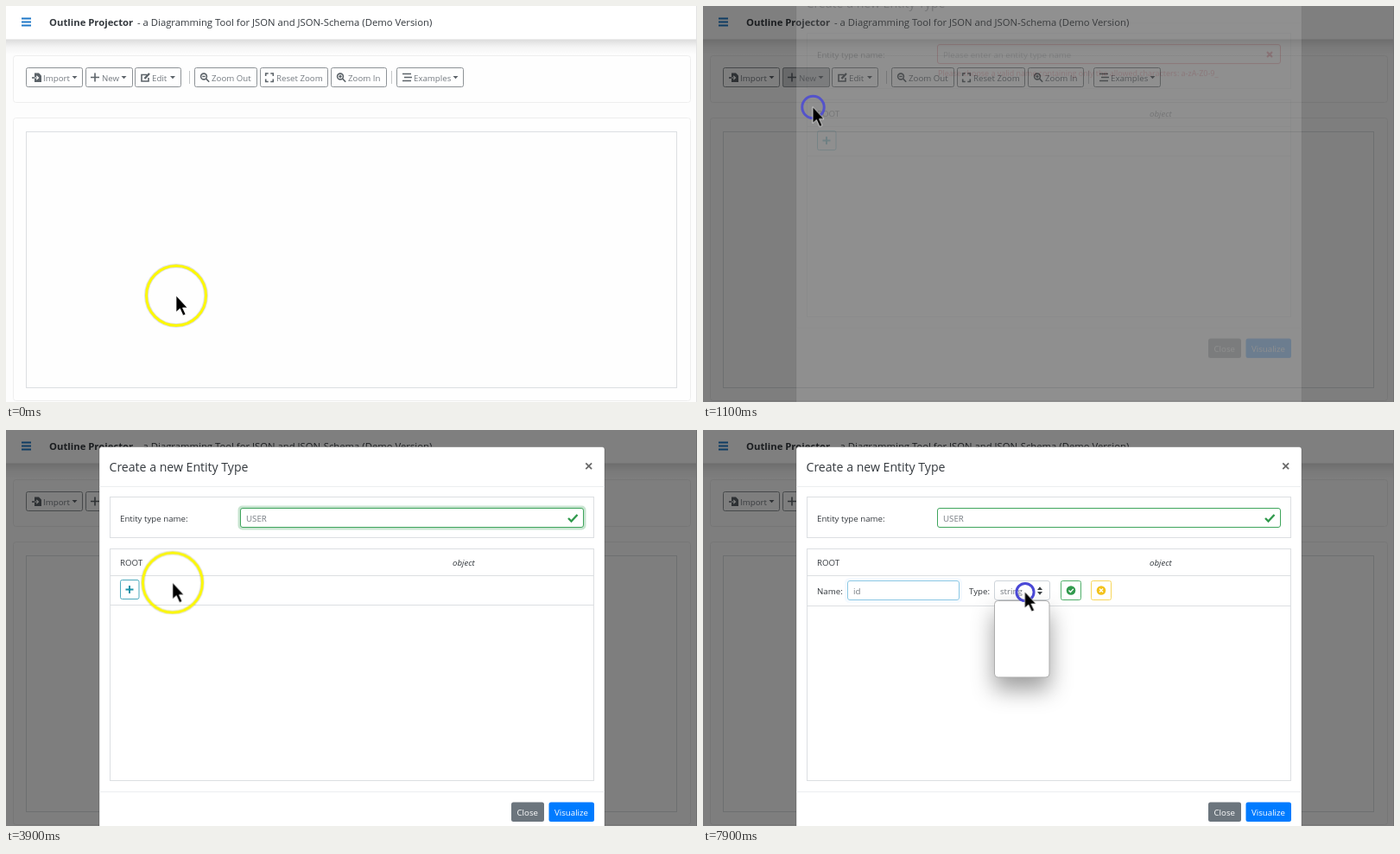
Write an HTML page that moves like this. It is 800x458 px and loops after 8000 ms.

```html
<!DOCTYPE html>
<html lang="en">
<head>
<meta charset="utf-8">
<title>Entity editor demo</title>
<style>
html, body { margin: 0; width: 100%; height: 100%; overflow: hidden; background: #fdfdfd; }
svg { display: block; width: 800px; height: 458px; }
text { font: 9.7px "Open Sans", "Noto Sans", sans-serif; fill: #34393e; white-space: pre; }
.bar text { fill: #747a80; }
.box { fill: none; stroke: #dcdfe2; }
.btn { fill: #fefefe; stroke: #8d9296; }
.ico { fill: none; stroke: #5c6369; stroke-width: 1.6; }
.solid { fill: #5c6369; }
.field { fill: #fff; stroke: #ced4da; }
.grey { fill: #747a80; }
.white { fill: #fff; }

/* One loop is 8 s, so 1% = 80 ms. */
.step, .move { animation: 8s infinite; }
.step { animation-timing-function: step-end; }
.move { animation-timing-function: ease-in-out; }

/* toolbar menu */
#active { animation-name: active; }
@keyframes active { 0% { opacity: 0 } 6% { opacity: 1 } 15%, to { opacity: 0 } }
#menu { animation-name: menu; }
@keyframes menu { 0% { opacity: 0 } 6.5% { opacity: 1 } 12%, to { opacity: 0 } }

/* dialog */
#shade { animation-name: shade; animation-timing-function: linear; }
@keyframes shade { 0%, 11.25% { opacity: 0 } 12.5% { opacity: .35 } 13.4%, to { opacity: .5 } }
#dialog { animation-name: slide, appear; animation-timing-function: linear; }
@keyframes slide {
  0%, 13.5% { transform: translateY(-50px) }
  16.25% { transform: translateY(-7px) }
  17.5%, to { transform: none }
}
@keyframes appear { 0%, 13.5% { opacity: 0 } 15.4%, to { opacity: 1 } }

/* entity name validation */
.bad { animation-name: bad; }
@keyframes bad { 0% { opacity: 1 } 29.75%, to { opacity: 0 } }
.good { animation-name: good; }
@keyframes good { 0% { opacity: 0 } 29.75%, to { opacity: 1 } }
.edge { animation-name: edge; }
@keyframes edge { 0% { stroke: #dc4a59 } 29.75%, to { stroke: #3fa55c } }
#glow { animation-name: edge, glow; }
@keyframes glow { 0% { opacity: 0 } 24.75% { opacity: .28 } 63.5%, to { opacity: 0 } }
#caret { animation-name: caret; }
@keyframes caret { 0% { opacity: 0 } 24.75% { opacity: 1 } 29.75%, to { opacity: 0 } }
#form { animation-name: form; }
@keyframes form { 0% { height: 64px } 29.75%, to { height: 47px } }
#panel { animation-name: panel; }
@keyframes panel { 0% { y: 154.5px; height: 251px } 29.75%, to { y: 137.5px; height: 268px } }
#head { animation-name: head; }
@keyframes head { 0% { transform: translateY(17px) } 29.75%, to { transform: none } }
#line { animation-name: line; }
@keyframes line { 0% { transform: none } 63.5%, to { transform: translateY(1px) } }

/* typed letters */
.l1 { animation-name: l1; }
@keyframes l1 { 0% { fill-opacity: 0 } 35%, to { fill-opacity: 1 } }
.l2 { animation-name: l2; }
@keyframes l2 { 0% { fill-opacity: 0 } 37.25%, to { fill-opacity: 1 } }
.l3 { animation-name: l3; }
@keyframes l3 { 0% { fill-opacity: 0 } 38.5%, to { fill-opacity: 1 } }
.l4 { animation-name: l4; }
@keyframes l4 { 0% { fill-opacity: 0 } 78.5%, to { fill-opacity: 1 } }
.l5 { animation-name: l5; }
@keyframes l5 { 0% { fill-opacity: 0 } 83.5%, to { fill-opacity: 1 } }

/* property row */
#plus { animation-name: plus; }
@keyframes plus { 0% { opacity: 1 } 63.5%, to { opacity: 0 } }
#row { animation-name: row; animation-timing-function: linear; }
@keyframes row { 0%, 64.5% { opacity: 0 } 65% { opacity: .04 } 69%, to { opacity: 1 } }
#halo { animation-name: halo; }
@keyframes halo { 0% { opacity: 0 } 69% { opacity: .25 } 97.8%, to { opacity: .05 } }
#ok { animation-name: ok; }
@keyframes ok { 0% { opacity: .6 } 83.5%, to { opacity: 1 } }
#list { animation-name: list; }
@keyframes list { 0% { opacity: 0 } 98.1%, to { opacity: 1 } }
#list rect { filter: drop-shadow(0 14px 13px rgba(0, 0, 0, .38)); }

/* pointer */
#pointer { animation-name: path; }
@keyframes path {
  0%, 1% { transform: translate(197px, 335px) }
  5%, 8% { transform: translate(119px, 85px) }
  10.5%, 13.75% { transform: translate(127px, 116.5px); animation-timing-function: ease-in }
  16.25% { transform: translate(173px, 147px); animation-timing-function: ease-out }
  22%, 43% { transform: translate(311px, 104px); animation-timing-function: step-end }
  44.5% { transform: translate(278px, 124px); animation-timing-function: ease-in }
  48.75% { transform: translate(193px, 176.5px); animation-timing-function: ease-out }
  54%, 68.75% { transform: translate(147px, 177px) }
  76%, 90% { transform: translate(197px, 180px) }
  94% { transform: translate(430px, 189px) }
  97%, to { transform: translate(372.5px, 187px) }
}
#shown { animation-name: shown; }
@keyframes shown {
  0% { opacity: 1 } 29.75% { opacity: 0 } 44.75% { opacity: 1 }
  78.5% { opacity: 0 } 89.75%, to { opacity: 1 }
}
#arrow { animation-name: arrow; }
@keyframes arrow { 0% { opacity: 1 } 21% { opacity: 0 } 44%, to { opacity: 1 } }
#beam { animation-name: beam; }
@keyframes beam { 0% { opacity: 0 } 21% { opacity: 1 } 44%, to { opacity: 0 } }
#ring { animation-name: ring; }
@keyframes ring {
  0% { opacity: 1 } 5.8% { opacity: 0 } 44.75% { opacity: 1 }
  63.4% { opacity: 0 } 89.75% { opacity: 1 } 97.8%, to { opacity: 0 }
}
.click {
  fill: none; stroke: #4a48d6; stroke-width: 3;
  animation: click 8s linear infinite;
  animation-delay: calc(var(--at) * 1ms - 8s);
}
@keyframes click {
  0% { r: 8px; opacity: 1 }
  1.4% { r: 11.8px; opacity: 1 }
  5% { r: 14.5px; opacity: .55 }
  6%, to { r: 15px; opacity: 0 }
}
</style>
</head>
<body>
<svg viewBox="0 0 800 458">
  <defs>
    <linearGradient id="fall" x2="0" y2="1">
      <stop stop-color="#000" stop-opacity=".14"/>
      <stop offset=".5" stop-color="#000" stop-opacity=".04"/>
      <stop offset="1" stop-color="#000" stop-opacity="0"/>
    </linearGradient>
    <path id="drop" class="solid" d="M0 0h6l-3 3.2z"/>
    <g id="lens" class="ico"><circle cx="4" cy="4" r="3.4"/><path d="M6.6 6.6l3.6 3.6M2.3 4h3.4"/></g>
  </defs>

  <!-- page -->
  <rect width="800" height="458" fill="#fdfdfd"/>
  <rect y="38" width="800" height="18" fill="url(#fall)"/>
  <rect width="800" height="38.5" fill="#fff"/>
  <path d="M799.5 0V458" stroke="#e3e3e3"/>
  <path d="M18 14.5h11M18 18.5h11M18 22.5h11" stroke="#1f78c8" stroke-width="2"/>
  <text x="50" y="23" style="font-size:11.3px;font-weight:700">Outline Projector</text>
  <text x="152" y="23" style="font-size:11.3px">- a Diagramming Tool for JSON and JSON-Schema (Demo Version)</text>
  <g fill="#fefefe" stroke="#eee">
    <rect x="8.5" y="57.5" width="784" height="54" rx="3"/>
    <rect x="8.5" y="129.5" width="784" height="327" rx="3"/>
  </g>
  <rect class="box" x="23.5" y="145.5" width="753" height="296"/>

  <!-- toolbar -->
  <g class="bar">
    <g class="btn">
      <rect x="23.5" y="71.5" width="65" height="22" rx="2"/>
      <rect x="92.5" y="71.5" width="54" height="22" rx="2"/>
      <rect x="149.5" y="71.5" width="53" height="22" rx="2"/>
      <rect x="218.5" y="71.5" width="72" height="22" rx="2"/>
      <rect x="294.5" y="71.5" width="78" height="22" rx="2"/>
      <rect x="376.5" y="71.5" width="64" height="22" rx="2"/>
      <rect x="452.5" y="71.5" width="77" height="22" rx="2"/>
    </g>
    <rect id="active" class="step" x="92.5" y="71.5" width="54" height="22" rx="2" fill="#cfd1d3" stroke="#8d9296"/>
    <path d="M212.5 75v15M446.5 75v15" stroke="#c4c6c8"/>
    <path class="solid" d="M33 77.5h5l3 3v7.5h-8z"/>
    <path d="M30 83h3" class="ico"/>
    <path d="M33 83h4.500M35.300 80.800l2.200 2.200-2.200 2.200" fill="none" stroke="#fff" stroke-width="1.200"/>
    <path class="ico" d="M98 82.500h10M103 77.500v10M163 79.500h-6v7.500h8v-4"/>
    <path d="M160.500 84l5.500-6" stroke="#5c6369" stroke-width="2.400"/>
    <use href="#lens" x="225" y="77.500"/>
    <path class="ico" d="M300.700 81v-3h3M306.300 78h3v3M309.300 84.500v3h-3M303.700 87.500h-3v-3"/>
    <use href="#lens" x="383" y="77.500"/>
    <path class="ico" d="M387 79.800v3.400M459 78.500h10M461 82.500h9M459 86.500h10"/>
    <use href="#drop" x="76.500" y="81"/>
    <use href="#drop" x="133.500" y="81"/>
    <use href="#drop" x="190" y="81"/>
    <use href="#drop" x="517.500" y="81"/>
    <text x="43" y="86.500">Import</text>
    <text x="111" y="86.500">New</text>
    <text x="169" y="86.500">Edit</text>
    <text x="238" y="86.500">Zoom Out</text>
    <text x="313" y="86.500">Reset Zoom</text>
    <text x="396" y="86.500">Zoom In</text>
    <text x="472" y="86.500">Examples</text>
  </g>
  <g id="menu" class="step">
    <rect x="92.500" y="96.500" width="104" height="36" rx="3" fill="#fff" stroke="#ccc"/>
    <text x="108" y="118">Entity Type</text>
  </g>

  <rect id="shade" class="move" width="800" height="458"/>

  <!-- dialog -->
  <g id="dialog" class="move">
    <rect x="108" y="19.500" width="585" height="500" rx="3" fill="#fff" stroke="#000" stroke-opacity=".2"/>
    <text x="119.500" y="48" style="font-size:14.100px;font-weight:500">Create a new Entity Type</text>
    <path d="M671.300 38.300l6.800 6.800m0-6.800l-6.800 6.800" stroke="#6a6a6a" stroke-width="1.800"/>
    <path d="M108 65.500h585M108 418.500h585" stroke="#eceef0"/>
    <rect id="form" class="box step" x="120.500" y="77.500" width="560" height="47"/>
    <text x="132" y="105.500">Entity type name:</text>
    <rect id="glow" class="step" x="270.500" y="89.500" width="399" height="24" rx="3" fill="none" stroke-width="4"/>
    <rect class="field edge step" x="271.500" y="90.500" width="397" height="22" rx="2.500"/>
    <g class="bad step">
      <text class="grey" x="278" y="105.500">Please enter an entity type name</text>
      <text x="272" y="126.500" style="font-size:8.960px;fill:#dc4a59">Please choose a valid name containing only the allowed characters: a-zA-Z0-9_</text>
      <path d="M653 99l6 6m0-6l-6 6" stroke="#d23347" stroke-width="2.200"/>
    </g>
    <path id="caret" class="step" d="M278.500 95v13" stroke="#222"/>
    <g class="good step">
      <text class="grey" x="278" y="105.500">U<tspan class="l1 step">S</tspan><tspan class="l2 step">E</tspan><tspan class="l3 step">R</tspan></text>
      <path d="M651 102l3.500 3.500 7-7.500" fill="none" stroke="#319a4d" stroke-width="2.400"/>
    </g>

    <rect id="panel" class="box step" x="120.500" y="137.500" width="560" height="268"/>
    <g id="head" class="step">
      <text x="132" y="156.500">ROOT</text>
      <text x="517" y="156.500" style="font-style:italic">object</text>
      <path d="M120 168.500h561" stroke="#dcdfe2"/>
      <path id="line" class="step" d="M120 202.500h561" stroke="#dcdfe2"/>
      <g id="plus" class="step">
        <rect x="132.500" y="173.500" width="21.500" height="22" rx="2" fill="#fff" stroke="#4ba9bd"/>
        <path d="M138.500 184.500h9M143 180v9" stroke="#1c93a9" stroke-width="2"/>
      </g>
    </g>

    <g id="row" class="move">
      <text x="132" y="189.500">Name:</text>
      <rect id="halo" class="step" x="165.500" y="172.500" width="133" height="26" rx="4" fill="none" stroke="#2b90ff" stroke-width="3"/>
      <rect class="field" x="167.500" y="174.500" width="129" height="22" rx="2.500" style="stroke:#8cc8e4"/>
      <text class="grey" x="174" y="189.500"><tspan class="l4 step">i</tspan><tspan class="l5 step">d</tspan></text>
      <text x="308" y="189.500">Type:</text>
      <rect class="field" x="337.500" y="174.500" width="64" height="22" rx="2.500"/>
      <text class="grey" x="344" y="189.500">string</text>
      <path d="M387 185l3-3.800 3 3.800zM387 187l3 3.800 3-3.800z" fill="#3b4045"/>
      <g id="ok" class="step">
        <rect x="414.500" y="174.500" width="23" height="22" rx="2" fill="#fff" stroke="#4fae69"/>
        <circle cx="426" cy="185.500" r="5.300" fill="#319a4d"/>
        <path d="M423.500 185.500l2 2 3.300-3.600" fill="none" stroke="#fff" stroke-width="1.400"/>
      </g>
      <rect x="449.500" y="174.500" width="23" height="22" rx="2" fill="#fff" stroke="#f7d65a"/>
      <circle cx="461" cy="185.500" r="5.300" fill="#f3c21c"/>
      <path d="M459 183.500l4 4m0-4l-4 4" stroke="#fff" stroke-width="1.400"/>
    </g>

    <rect x="585" y="430.500" width="38" height="22.500" rx="2.500" fill="#6c757d"/>
    <rect x="628.500" y="430.500" width="52.500" height="22.500" rx="2.500" fill="#007bff"/>
    <text class="white" x="591.500" y="445.500">Close</text>
    <text class="white" x="635" y="445.500">Visualize</text>
  </g>

  <!-- clicks and pointer -->
  <circle class="click" cx="119" cy="85" style="--at:480"/>
  <circle class="click" cx="127.500" cy="117" style="--at:890"/>
  <circle class="click" cx="312" cy="104" style="--at:1960"/>
  <circle class="click" cx="147.500" cy="177" style="--at:5080"/>
  <g id="list" class="step">
    <rect x="337.500" y="197.500" width="63.500" height="88.500" rx="4" fill="#fff" stroke="#adadad"/>
    <circle class="click" cx="373" cy="187.500" style="--at:7840"/>
  </g>
  <g id="pointer" class="move">
    <g id="shown" class="step">
      <g id="ring" class="step" fill="none">
        <circle r="34.500" stroke="#000" stroke-opacity=".12" stroke-width="5"/>
        <circle r="34.500" stroke="#fcf803" stroke-width="3"/>
      </g>
      <path id="arrow" class="step" d="M0 0V19L4.400 15 8 23 11 21.600 7.500 14H13Z" stroke="#fff" stroke-width=".7"/>
      <g id="beam" class="step" fill="none">
        <path d="M-4-9.500h8M0-9.500v19M-4 9.500h8" stroke="#fff" stroke-width="4"/>
        <path d="M-4-9.500h8M0-9.500v19M-4 9.500h8" stroke="#000" stroke-width="1.800"/>
      </g>
    </g>
  </g>
</svg>
</body>
</html>
```
